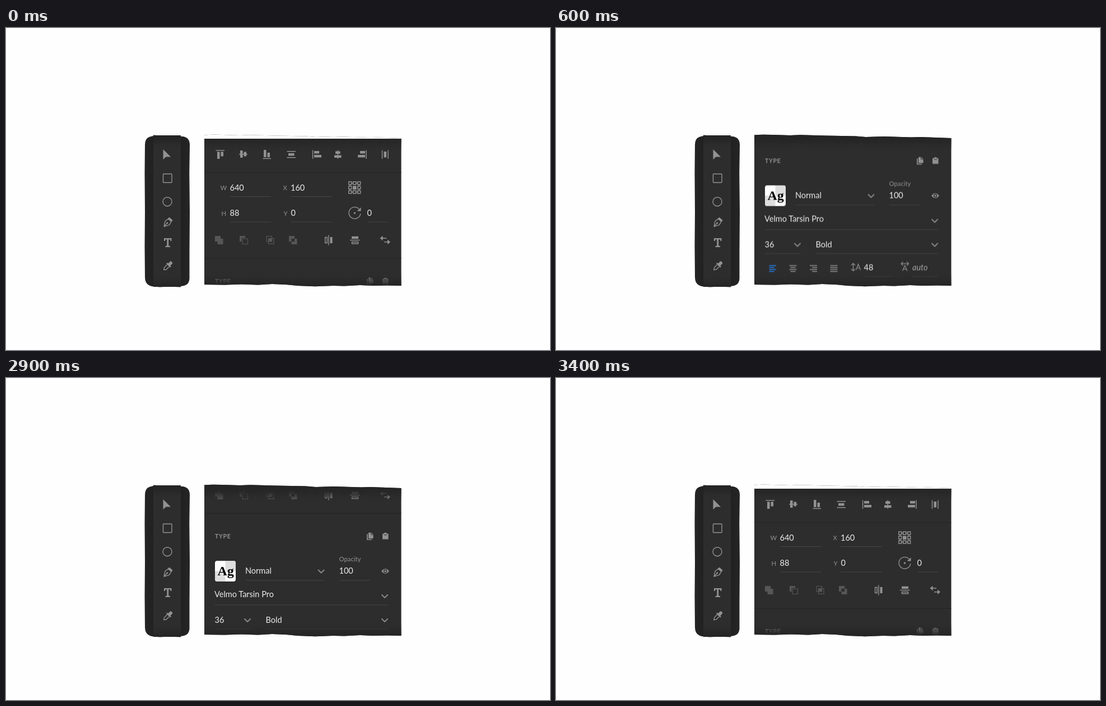
Write an HTML page that moves like this. It is 971 px wide and 576 px high and loops after 5400 ms.

```html
<!DOCTYPE html>
<html lang="en">
<head>
<meta charset="utf-8">
<title>Design panel</title>
<style>
  html, body { margin: 0; width: 100%; height: 100%; overflow: hidden; background: #fefefe; }
  svg { display: block; width: 971px; height: 576px; }
  text { font-family: Lato, "Noto Sans", sans-serif; }
  .value { font-size: 14.5px; fill: #ececec; }
  .label { font-size: 11.3px; fill: #929292; }
  .head { font-size: 10.5px; font-weight: 700; letter-spacing: .75px; fill: #929292; }
  .auto { font-style: italic; fill: #a2a2a2; }
  .sample { font: 700 24px "Liberation Serif", serif; fill: #000; }
  .fill { fill: #929292; }
  .line { fill: none; stroke: #929292; stroke-width: 1.4; }
  .dim { fill: #565656; }
  .dim-line { fill: none; stroke: #565656; stroke-width: 1.2; }
  .rule { stroke: #464646; }
  .divider { stroke: #242424; }
  .chevron { fill: none; stroke: #858585; stroke-width: 2.1; stroke-linecap: round; stroke-linejoin: round; }
  .scroll { animation: scroll 5400ms step-end infinite; }
  .cover { animation: cover 5400ms step-end infinite; }
  @keyframes scroll {
    0% { transform: translateY(0); }
    1.8518% { transform: translateY(-3px); }
    3.7037% { transform: translateY(-16px); }
    5.5555% { transform: translateY(-49px); }
    7.4074% { transform: translateY(-108px); }
    9.2592% { transform: translateY(-170px); }
    11.1111% { transform: translateY(-215.5px); }
    12.9629% { transform: translateY(-234px); }
    14.8148% { transform: translateY(-238px); }
    51.8518% { transform: translateY(-215.5px); }
    53.7037% { transform: translateY(-170px); }
    55.5555% { transform: translateY(-108px); }
    57.4074% { transform: translateY(-49px); }
    59.2592% { transform: translateY(-16px); }
    61.1111% { transform: translateY(-3px); }
    62.9629%, 100% { transform: translateY(0); }
  }
  @keyframes cover {
    0% { opacity: 1; }
    1.8518% { opacity: 0; }
    62.9629%, 100% { opacity: 1; }
  }
</style>
</head>
<body>
<svg viewBox="0 0 971 576" xmlns="http://www.w3.org/2000/svg">
  <defs>
    <linearGradient id="top" x1="0" y1="0" x2="0" y2="1">
      <stop offset="0" stop-color="#242424"/>
      <stop offset=".45" stop-color="#272727" stop-opacity=".9"/>
      <stop offset="1" stop-color="#2d2d2d" stop-opacity="0"/>
    </linearGradient>
    <linearGradient id="bottom" x1="0" y1="1" x2="0" y2="0">
      <stop offset="0" stop-color="#242424"/>
      <stop offset=".25" stop-color="#262626" stop-opacity=".85"/>
      <stop offset="1" stop-color="#2d2d2d" stop-opacity="0"/>
    </linearGradient>
    <linearGradient id="side">
      <stop offset="0" stop-color="#252525"/>
      <stop offset=".19" stop-color="#212121"/>
      <stop offset=".81" stop-color="#212121"/>
      <stop offset="1" stop-color="#252525"/>
    </linearGradient>
    <clipPath id="panel">
      <path d="M354 191.5 370 190.5 418 192 436 191.2 480 192.5 535 193.5 553 195 585 194 634 195.5 650 195 705.500 197V461L680 460.500 655 461 632 460 604 461.500 584 461 552 462.300 520 461 500 459 475 458 450 459.500 420 458.500 390 459.500 354 459Z"/>
    </clipPath>
    <path id="chevron" class="chevron" d="M-5-2.500 0 2.500 5-2.500"/>
  </defs>

  <!-- Toolbar -->
  <path fill="url(#side)" d="M263 193V191.500L275 192.500 290 192 312 192.500V194H316Q328 196 328 209L327.300 260 328 330 327.500 400 327.500 448Q327 460 315 461.500L312 462V463.500L290 462.500 275 463.500 263 462.500Q248 461 248 446L247.500 390 248 330 247.500 260 248 209Q248 196 259 194Z"/>
  <path fill="#2d2d2d" d="M263 192H312V463H263Z"/>
  <path fill="url(#top)" d="M263 192H312V216H263Z"/>
  <path fill="url(#bottom)" d="M263 440H312V463H263Z"/>
  <path class="fill" d="M280.500 217V235.300L285.500 230.500H294Z"/>
  <rect class="line" x="280.500" y="261" width="15.500" height="15.500" rx="1"/>
  <circle class="line" cx="288" cy="310.700" r="8"/>
  <g transform="translate(288.500 348) rotate(42)">
    <path class="line" d="M-3.500-6H3.500L5 1Q3 5 0 9.500-3 5-5 1ZM0 9V2"/>
    <path class="fill" d="M-4.200-9H4.200V-5H-4.200Z"/>
    <circle class="fill" cy="1" r="1.500"/>
  </g>
  <path class="fill" d="M282 376H295.500V381H293.500L293 378.300H290.200V389.500L293 390V392H284.500V390L287.300 389.500V378.300H284.500L284 381H282Z"/>
  <g transform="translate(288.500 426) rotate(45)">
    <path class="fill" d="M-2.800-9.500Q0-12 2.800-9.500V-4H5V-1.500H-5V-4H-2.800Z"/>
    <path class="line" d="M-2.500-1V6L0 9.500 2.500 6V-1"/>
  </g>

  <!-- Properties panel -->
  <g clip-path="url(#panel)">
    <path fill="#2d2d2d" d="M354 190H706V464H354Z"/>
    <g class="scroll">
      <path class="fill" d="M377 221.500h4.500v12.500h-4.500zM383.500 221.500h4.500v8h-4.500zM418 219h4.500v13h-4.500zM424.500 221.500h4.500v8h-4.500zM460 218h4.500v13h-4.500zM466.500 223h4.500v8h-4.500zM504 224h10.500v4.500h-10.500zM550 220h9v4.500h-9zM550 227h13v4.500h-13zM588 220.500h8.500v4.500h-8.500zM586 227.500h12.500v4.500h-12.500zM632 220h9v4.500h-9zM628 227h13v4.500h-13zM674.500 221h4.500v10.500h-4.500z"/>
      <path class="line" d="M374.500 219H390M416 225.700H431M458.500 233.500H473M501.500 220.700H517M501.500 231.800H517M547.500 218.500V234M592.200 218.500V234M643 218.500V234M671.500 218.500V234M682 218.500V234"/>
      <path class="divider" d="M354 258.500H706M354 412H706"/>

      <text class="label" x="382.500" y="290">W</text>
      <text class="value" x="399.500" y="290.500">640</text>
      <text class="label" x="494.500" y="290">X</text>
      <text class="value" x="508" y="290.500">160</text>
      <text class="label" x="384.500" y="335.500">H</text>
      <text class="value" x="399.500" y="336">88</text>
      <text class="label" x="495.500" y="335.500">Y</text>
      <text class="value" x="508.500" y="336">0</text>
      <text class="value" x="644.500" y="336">0</text>
      <path class="rule" d="M400 301.500H473M508 301.500H582M400 347H473M508 347H582M645 347H682"/>

      <path class="line" d="M611.700 275h5v5h-5zM619.700 275h5v5h-5zM627.700 275h5v5h-5zM611.700 283h5v5h-5zM627.700 283h5v5h-5zM611.700 291h5v5h-5zM619.700 291h5v5h-5zM627.700 291h5v5h-5zM616.700 277.500h3m5 0h3M616.700 293.500h3m5 0h3M614.200 280v3m0 5v3M630.200 280v3m0 5v3"/>
      <path class="fill" d="M619 282.500h6.500v6.500h-6.500z"/>

      <path class="line" stroke-width="1.700" d="M632.800 332A10.400 10.400 0 1 1 630 323.600"/>
      <path class="fill" d="M633.500 321V327.500H626.500Z"/>
      <circle class="fill" cx="622.400" cy="331" r="1.700"/>

      <path class="dim" d="M373 372h10v5h4.500v10h-10v-5H373zM417 372h10v3.500h-6.500v6.500H417zM468.700 376.700h5.300v5.300h-5.300z"/>
      <path class="dim-line" d="M422 377h9.500v9.500h-9.500zM465 372.500h9.500v9.500h-9.500zM468.500 376.700h9.500v9.500h-9.500z"/>
      <path class="dim" fill-rule="evenodd" d="M505 372h10v5h4.500v10h-10v-5H505zM509.500 377h5.500v5h-5.500z"/>

      <path class="line" d="M569.600 374.500h3.500v10h-3.500zM575.800 370.500V388.500M614 379.500H631.500M617.500 382.700h11v3h-11z"/>
      <path class="fill" d="M578.500 374h4v11h-4zM617 372.800h12v4.200h-12z"/>
      <path class="line" stroke-width="1.800" d="M671 376H679M675 382.700H683"/>
      <path class="fill" d="M667.500 376 672.500 371.700V380.300ZM686 382.700 681 378.400V387Z"/>

      <g transform="translate(0 215.500)">
        <text class="head" x="373" y="241">TYPE</text>
        <path class="fill" d="M647 231h5l3.500 3.500v7H647zM644 233.500h1.700v9.300h7.300v1.500h-9zM672 233h2.500l1-1.700h3.500l1 1.700h2.500v10H672z"/>
        <path stroke="#2d2d2d" fill="none" d="M651.700 231v3.800h3.800M674.500 235.200h5.500"/>

        <rect x="373" y="281.500" width="37" height="37" rx="4" fill="#fff"/>
        <path fill="#dedede" d="M391.500 281.500H406Q410 281.500 410 285.500V300H391.500ZM373 300H391.500V318.500H377Q373 318.500 373 314.500Z"/>
        <text class="sample" x="377.500" y="307.500">Ag</text>
        <text class="value" x="427" y="304.500">Normal</text>
        <text class="label" x="594.500" y="282">Opacity</text>
        <text class="value" x="594.500" y="304.500">100</text>
        <path class="fill" d="M670 300Q677 291.500 684 300 677 308.500 670 300Z"/>
        <circle cx="677" cy="300" r="3.200" fill="#2d2d2d"/>
        <circle class="fill" cx="677" cy="300" r="1.700"/>

        <text class="value" x="372" y="346.500">Velmo Tarsin Pro</text>
        <text class="value" x="372.500" y="392">36</text>
        <text class="value" x="463.500" y="392">Bold</text>
        <use href="#chevron" x="562.500" y="300.500"/>
        <use href="#chevron" x="676" y="345"/>
        <use href="#chevron" x="431" y="388"/>
        <use href="#chevron" x="676" y="388"/>

        <path class="line" style="stroke:#2680eb" d="M380.500 425H393M380.500 428.500H389.500M380.500 432H393M380.500 435.500H389.500"/>
        <path class="line" stroke-width="1.200" d="M416.500 425H429.500M418.500 428.500H427.500M416.500 432H429.500M418.500 435.500H427.500M453 425H466M457 428.500H466M453 432H466M457 435.500H466M489.500 425H502.500M489.500 428.500H502.500M489.500 432H502.500M489.500 435.500H502.500"/>
        <path class="line" style="stroke-width:1.200" d="M530.500 421V434.500M527 424.500 530.500 421 534 424.500M527 431 530.500 434.500 534 431M616 421.700H629.500M619.500 418.200 616 421.700 619.500 425.200M626 418.200 629.500 421.700 626 425.200M535.500 433 539.500 422.500 543.500 433M537 429.500H542M618.500 434.500 622.700 425 627 434.500M620 431.300H625.500"/>
        <text class="value" x="549.500" y="433">48</text>
        <text class="value auto" x="636" y="433">auto</text>
        <path class="rule" d="M428 316.500H568M595 316.500H650M373 360.500H682M373 403.500H437M463 403.500H682M550 444.500H600M636 444.500H682"/>
      </g>
    </g>
    <path fill="url(#top)" d="M354 191H706V220H354Z"/>
    <path fill="url(#bottom)" d="M354 437H706V463H354Z"/>
    <path class="cover" fill="#fefefe" d="M353 189H707V198H353Z"/>
  </g>
</svg>
</body>
</html>
```
